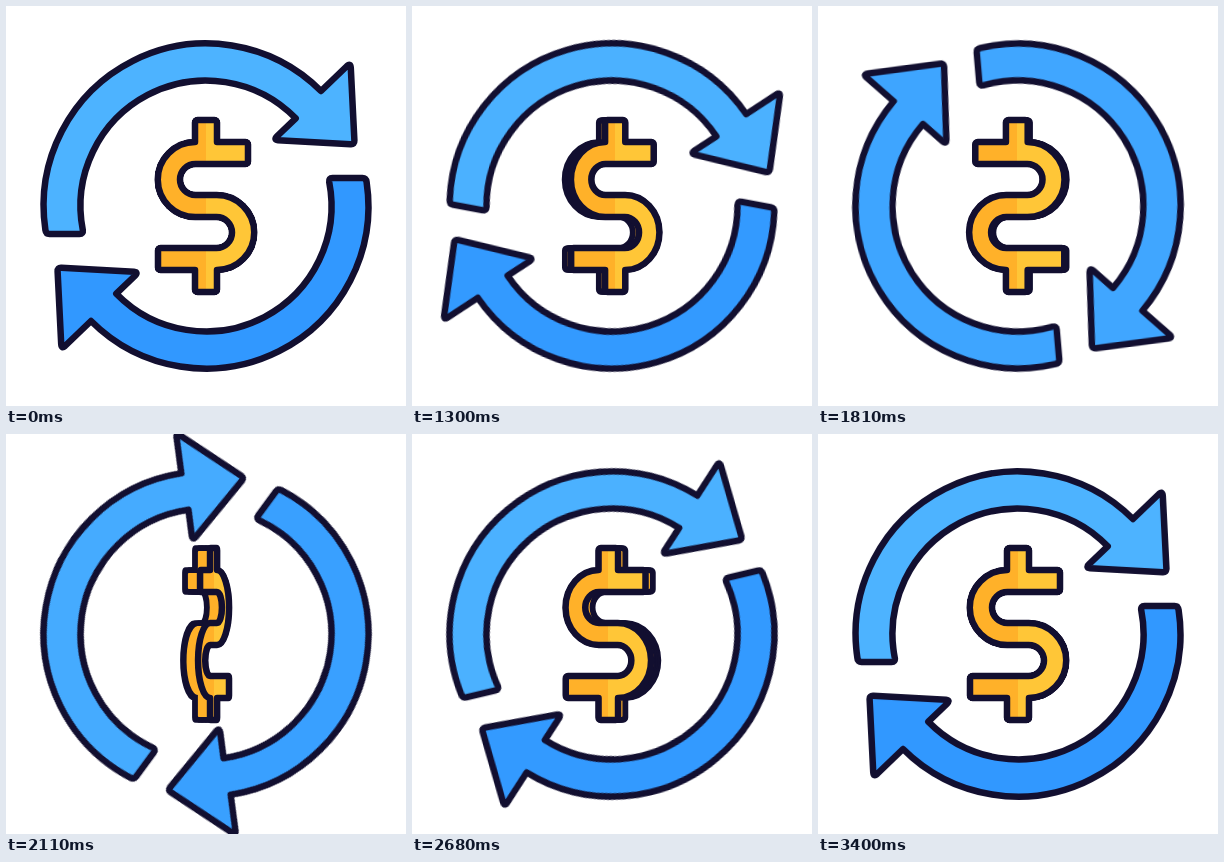
An HTML page without scripts that plays this animation: 400 px wide and 400 px high, repeating every 3430 ms.

```html
<!DOCTYPE html>
<html lang="en">
<head>
<meta charset="utf-8">
<title>Money cycle</title>
<style>
  @property --turn { syntax: '<angle>'; inherits: true; initial-value: 0deg; }

  :root { --ink: #120f30; --light: #4db3ff; --dark: #3198ff; --amber: #ffb129; --loop: 3430ms; }
  html, body { margin: 0; width: 100%; height: 100%; overflow: hidden; background: #fff; }
  svg { display: block; width: 400px; height: 400px; }

  path { stroke-linejoin: round; vector-effect: non-scaling-stroke; }
  .ring, .face { stroke: var(--ink); stroke-width: 6.5px; }

  .ring, .coin use { transform-origin: 200px 200px; }
  .ring { animation: spin var(--loop) infinite; }
  .from-light { animation: darken var(--loop) infinite; }
  .from-dark { animation: lighten var(--loop) infinite; }

  @keyframes spin {
    0%, 29.15% { transform: rotate(0deg); animation-timing-function: cubic-bezier(.33, 0, .26, 1); }
    100% { transform: rotate(180deg); }
  }
  @keyframes darken {
    0%, 29.15% { fill: var(--light); animation-timing-function: cubic-bezier(.33, 0, .26, 1); }
    100% { fill: var(--dark); }
  }
  @keyframes lighten {
    0%, 29.15% { fill: var(--dark); animation-timing-function: cubic-bezier(.33, 0, .26, 1); }
    100% { fill: var(--light); }
  }
  @keyframes flip {
    0%, 29.15% { --turn: 0deg; animation-timing-function: cubic-bezier(.31, 0, .277, 1); }
    100% { --turn: 360deg; }
  }

  /* The sign is an extruded solid seen without perspective. */
  .coin {
    --cos: cos(var(--turn));
    --sin: sin(var(--turn));
    --facing: clamp(-1, 1000 * var(--cos), 1);
    --side: clamp(-1, 1000 * var(--sin), 1) * var(--facing);
    --near: 8px * var(--sin) * var(--facing);
    --inset: 4px * (1 - var(--cos) * var(--facing)) * var(--side);
    animation: flip var(--loop) infinite;
  }
  /* --z runs from 0 at the far side to 1 at the near side */
  .coin use { transform: translateX(calc(var(--near) * (2 * var(--z) - 1))) scaleX(calc(var(--cos))); }
  /* Slightly thinner than the face so stacked edges stay smooth */
  .rim { fill: var(--ink); stroke: var(--ink); stroke-width: 5.6px; }
  .wall { fill: var(--amber); stroke: var(--amber); stroke-width: 2px; }
  .wall use {
    transform: translateX(calc(var(--near) * (2 * var(--z) - 1) + var(--inset) * (1 - var(--z)))) scaleX(calc(var(--cos)));
  }
  .face { --z: 1; }
  .front { fill: url(#front); opacity: clamp(0, 1000 * var(--cos), 1); }
  .back { fill: url(#back); opacity: clamp(0, -1000 * var(--cos), 1); }
</style>
</head>
<body>
<svg viewBox="0 0 400 400">
  <defs>
    <path id="arrow" d="M39.4 224A162.5 162.5 0 0 1 315 85L341 60Q344.5 57 344.8 62L348.4 134.5Q348.6 138.5 344.6 138.2L272 134.2Q267.5 133.8 271 130.3L289.7 112.3A125.5 125.5 0 0 0 76.8 224Q77.4 228 73.5 228H43.5Q40 228 39.4 224Z"/>
    <path id="sign" d="M189 136V116.5a2.5 2.5 0 0 1 2.5-2.5h17a2.5 2.5 0 0 1 2.5 2.5V136H239.5a2.5 2.5 0 0 1 2.5 2.5v17a2.5 2.5 0 0 1-2.5 2.5H189.5a15.5 15.5 0 0 0 0 31H210.5a37.5 37.5 0 0 1 .5 75V283.5a2.5 2.5 0 0 1-2.5 2.5h-17a2.5 2.5 0 0 1-2.5-2.5V264H154.5a2.5 2.5 0 0 1-2.5-2.5v-17a2.5 2.5 0 0 1 2.5-2.5H210.5a15.5 15.5 0 0 0 0-31H189.5a37.5 37.5 0 0 1-.5-75Z"/>
    <path id="core" d="M193 140V118H207V140H238V154H189.5a19.5 19.5 0 0 0 0 39H210.5a33.5 33.5 0 0 1-3.5 67V282H193V260H156V246H210.5a19.5 19.5 0 0 0 0-39H189.5a33.5 33.5 0 0 1 3.5-67Z"/>
    <linearGradient id="front" gradientUnits="userSpaceOnUse" x1="199" x2="201" y1="0" y2="0">
      <stop offset=".5" stop-color="#ffb129"/><stop offset=".5" stop-color="#ffc637"/>
    </linearGradient>
    <linearGradient id="back" gradientUnits="userSpaceOnUse" x1="201" x2="199" y1="0" y2="0">
      <stop offset=".5" stop-color="#ffb129"/><stop offset=".5" stop-color="#ffc637"/>
    </linearGradient>
  </defs>

  <g class="ring">
    <use href="#arrow" class="from-light"/>
    <use href="#arrow" class="from-dark" transform="rotate(180 200 200)"/>
  </g>

  <g class="coin">
    <g class="rim">
      <use href="#sign" style="--z:0"/>
      <use href="#sign" style="--z:.25"/>
      <use href="#sign" style="--z:.5"/>
      <use href="#sign" style="--z:.75"/>
      <use href="#sign" style="--z:1"/>
    </g>
    <g class="wall">
      <use href="#core" style="--z:0"/>
      <use href="#core" style="--z:.1"/>
      <use href="#core" style="--z:.2"/>
      <use href="#core" style="--z:.3"/>
      <use href="#core" style="--z:.4"/>
      <use href="#core" style="--z:.5"/>
      <use href="#core" style="--z:.6"/>
      <use href="#core" style="--z:.7"/>
      <use href="#core" style="--z:.8"/>
      <use href="#core" style="--z:.9"/>
      <use href="#core" style="--z:1"/>
    </g>
    <use href="#sign" class="face front"/>
    <use href="#sign" class="face back"/>
  </g>
</svg>
</body>
</html>
```
